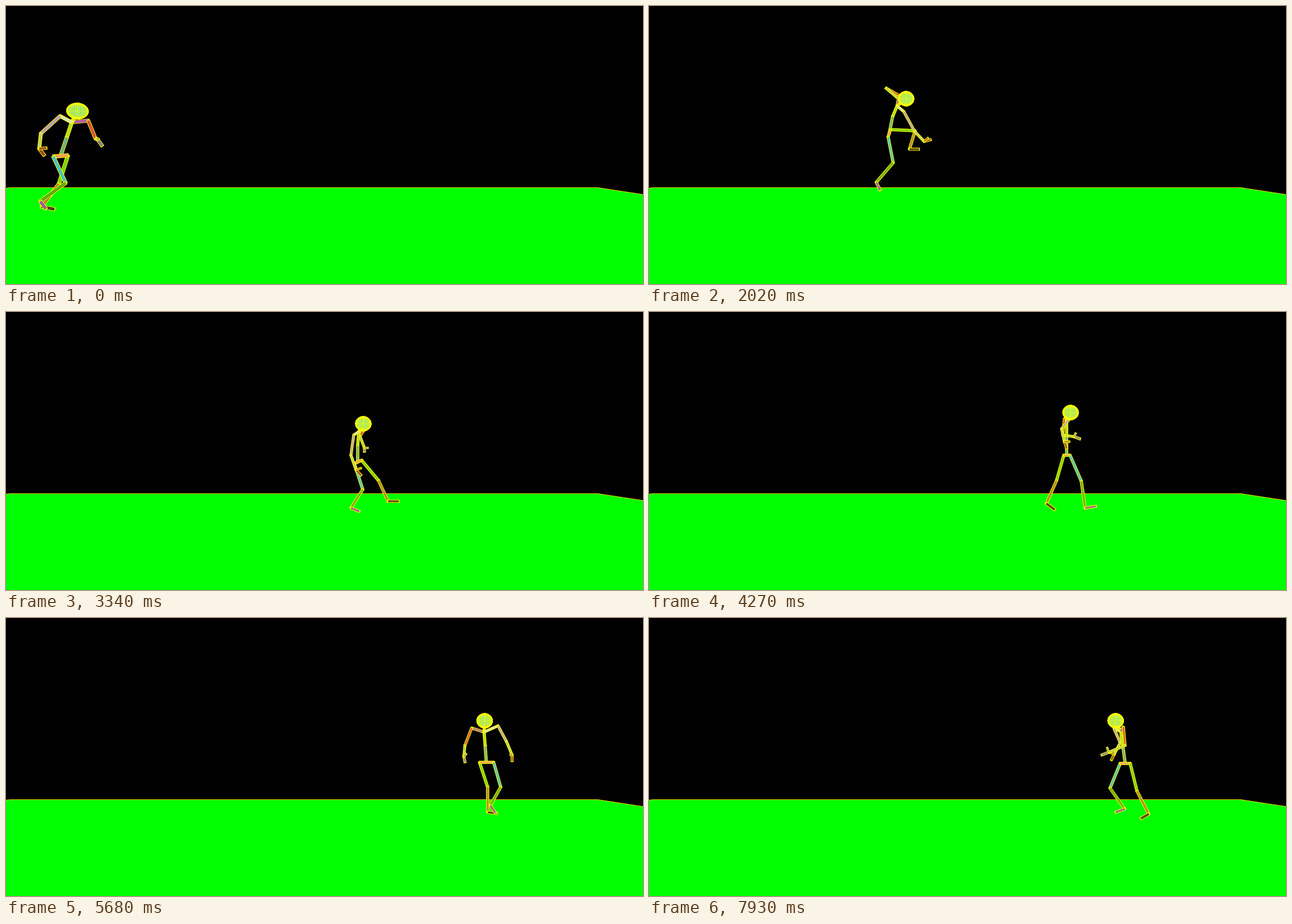
An HTML page with a canvas for the animation above (8000 ms loop, 1132 px wide and 495 px high).

```html
<!DOCTYPE html>
<html>
<head>
<meta charset="utf-8">
<style>
html, body { margin: 0; height: 100%; overflow: hidden; background: #000; }
canvas { display: block; }
</style>
</head>
<body>
<canvas id="stage" width="1132" height="495"></canvas>
<script>
const ctx = document.getElementById('stage').getContext('2d');
const LOOP = 8000, STEP = LOOP / 103, LAST = 102;
const YELLOW = '#ff0';

// Every part is a track of flat x,y lists, kept relative to the hip centre.
const tracks = { hip: [], trunk: [], pelvis: [], armA: [], armB: [], legA: [], legB: [] };

function key(time, hip, parts) {
  tracks.hip.push({ time, v: hip });
  for (const name in parts)
    tracks[name].push({ time, v: parts[name].map((n, i) => n - hip[i % 2]) });
}

// trunk: head, neck, mid spine; pelvis: two hips;
// arm: shoulder, elbow, wrist, fingers, thumb; leg: knee, ankle, toe
key(0, [97, 267], {
  trunk: [127, 187, 117, 207, 108, 234], pelvis: [84, 268, 110, 266],
  armA: [96, 196, 62, 227, 59, 254, 68, 266, 72, 253],
  armB: [146, 204, 159, 236, 163, 238, 171, 249, 164, 236],
  legA: [106, 315, 61, 348, 71, 361], legB: [94, 317, 63, 357, 86, 362] });
key(300, [123, 263], {
  legA: [150, 302, 124, 356, 146, 367], legB: [126, 312, 85, 340, 94, 357] });
key(540, [148, 264], {
  legA: [160, 312, 120, 358, 140, 370], legB: [172, 306, 140, 335, 152, 349] });
key(860, [203, 266], {
  armA: [227, 205, 220, 239, 252, 243, 270, 240, 262, 234],
  legA: [188, 316, 112, 344, 120, 362], legB: [240, 304, 228, 352, 250, 356] });
key(1090, [247, 272], {
  trunk: [282, 195, 272, 208, 259, 240], pelvis: [243, 273, 252, 271],
  armA: [268, 207, 256, 239, 285, 254, 300, 253, 292, 246],
  armB: [281, 211, 268, 236, 284, 257, 290, 268, 291, 247],
  legA: [265, 322, 205, 329, 211, 347], legB: [269, 321, 228, 357, 249, 360] });
key(1400, [305, 268], {
  legA: [340, 300, 350, 344, 370, 341], legB: [296, 314, 250, 338, 260, 353] });
key(1700, [372, 260], {
  trunk: [398, 192, 386, 205, 378, 230],
  legA: [395, 305, 366, 344, 384, 356], legB: [402, 286, 372, 316, 380, 331] });
key(2020, [427, 227], {
  trunk: [457, 165, 441, 178, 433, 197], pelvis: [425, 233, 429, 220],
  armA: [453, 188, 472, 223, 489, 241, 501, 238, 496, 235],
  armB: [444, 159, 421, 146, 440, 162, 447, 166, 446, 160],
  legA: [434, 279, 404, 314, 411, 328], legB: [473, 222, 463, 255, 480, 255] });
key(2570, [518, 213], {
  trunk: [538, 147, 528, 161, 520, 187],
  legA: [526, 261, 503, 297, 512, 310], legB: [553, 233, 540, 272, 557, 273] });
key(2950, [575, 244], {
  trunk: [590, 176, 582, 190, 576, 216],
  legA: [594, 290, 598, 342, 617, 346], legB: [612, 272, 606, 313, 624, 315] });
key(3340, [625, 267], {
  trunk: [635, 199, 627, 213, 625, 238], pelvis: [619, 270, 632, 264],
  armA: [618, 219, 613, 255, 622, 281, 631, 291, 631, 278],
  armB: [635, 212, 629, 221, 637, 242, 637, 249, 643, 242],
  legA: [634, 316, 613, 349, 628, 355], legB: [662, 300, 679, 337, 698, 337] });
key(3800, [688, 257], {
  legA: [708, 300, 676, 332, 688, 345], legB: [697, 302, 693, 346, 713, 350] });
key(4270, [742, 255], {
  trunk: [749, 179, 742, 192, 742, 222], pelvis: [748, 255, 737, 255],
  armA: [749, 188, 733, 208, 738, 231, 742, 243, 747, 231],
  armB: [738, 190, 735, 219, 755, 222, 766, 226, 758, 216],
  legA: [768, 301, 775, 349, 794, 346], legB: [724, 300, 706, 341, 721, 352] });
key(4700, [792, 254], {
  legA: [796, 302, 777, 350, 797, 350], legB: [806, 298, 780, 332, 792, 345] });
key(5140, [828, 257], {
  legA: [818, 305, 776, 340, 789, 351], legB: [848, 300, 853, 344, 873, 343] });
key(5680, [854, 257], {
  trunk: [851, 183, 850, 203, 852, 228], pelvis: [867, 257, 842, 257],
  armA: [875, 192, 890, 220, 900, 244, 900, 255, 897, 243],
  armB: [828, 196, 816, 227, 814, 247, 816, 257, 818, 242],
  legA: [880, 301, 862, 334, 871, 347], legB: [856, 301, 856, 346, 872, 348] });
key(6010, [867, 256], {
  legA: [891, 301, 892, 342, 906, 347], legB: [862, 302, 858, 345, 872, 350] });
key(6450, [874, 255], {
  armA: [895, 190, 909, 219, 919, 243, 917, 254, 914, 243],
  legA: [890, 301, 893, 344, 900, 350], legB: [868, 300, 872, 330, 870, 342] });
key(6870, [872, 256], {
  legA: [872, 302, 886, 338, 880, 349], legB: [882, 304, 893, 346, 888, 357] });
key(7400, [860, 257], {
  legA: [838, 302, 866, 335, 852, 344], legB: [874, 306, 890, 349, 876, 358] });
key(7930, [846, 259], {
  trunk: [829, 183, 838, 202, 842, 229], pelvis: [837, 259, 855, 259],
  armA: [826, 197, 837, 222, 826, 243, 821, 253, 820, 240],
  armB: [843, 194, 846, 227, 817, 239, 804, 244, 814, 231],
  legA: [819, 303, 845, 340, 829, 346], legB: [867, 308, 888, 349, 874, 357] });

// Smooth curve through the keys
function sample(track, t) {
  const next = track.findIndex(k => k.time > t);
  if (next < 0) return track[track.length - 1].v;
  const b = track[next - 1], c = track[next];
  const a = track[next - 2] || b, d = track[next + 1] || c;
  const span = c.time - b.time, u = (t - b.time) / span;
  const w = u * u * (3 - 2 * u), out = u * (1 - u) ** 2, into = u * u * (u - 1);
  return b.v.map((p, i) => {
    const q = c.v[i];
    const m0 = (q - a.v[i]) / (c.time - a.time) * span;
    const m1 = (d.v[i] - p) / (d.time - b.time) * span;
    return p + (q - p) * w + m0 * out + m1 * into;
  });
}

function points(name, t, hip) {
  const v = sample(tracks[name], t), list = [];
  for (let i = 0; i < v.length; i += 2) list.push([v[i] + hip[0], v[i + 1] + hip[1]]);
  return list;
}

function line(p, q, width, color) {
  ctx.lineWidth = width;
  ctx.strokeStyle = color;
  ctx.beginPath();
  ctx.moveTo(...p);
  ctx.lineTo(...q);
  ctx.stroke();
}

function bone(p, q, color, width) {
  const len = Math.hypot(q[0] - p[0], q[1] - p[1]) || 1;
  const ex = (q[0] - p[0]) / len * 1.5, ey = (q[1] - p[1]) / len * 1.5;
  line([p[0] - ex, p[1] - ey], [q[0] + ex, q[1] + ey], width, YELLOW);
  line(p, q, width - 2.4, color);
  line(p, q, 0.8, '#dd3');
}

function chain(joints, colors, width) {
  colors.forEach((color, i) => bone(joints[i], joints[i + 1], color, width));
}

function drawHead([x, y], rx, ry) {
  const ring = (a, b) => {
    ctx.beginPath();
    ctx.ellipse(x, y, Math.max(a, 0.1), Math.max(b, 0.1), 0.08, 0, 7);
  };
  ring(rx, ry);
  ctx.fillStyle = '#6fd9a0';
  ctx.fill();
  ctx.strokeStyle = YELLOW;
  ctx.lineWidth = 1;
  for (let i = 0; i <= 8; i++) {
    const s = Math.sin(i * Math.PI / 16);
    ring(rx * s, ry);
    ctx.stroke();
    const h = ry * s, half = rx * Math.sqrt(1 - s * s);
    for (const side of [-1, 1])
      line([x - half, y + side * h], [x + half, y + side * h], 0.7, YELLOW);
  }
  ctx.lineWidth = 3;
  ring(rx - 1.5, ry - 1.5);
  ctx.stroke();
}

function drawGround() {
  ctx.fillStyle = '#000';
  ctx.fillRect(0, 0, 1132, 495);
  ctx.beginPath();
  ctx.moveTo(-2, 324.5);
  ctx.lineTo(8, 323.5);
  ctx.lineTo(1052, 323.5);
  ctx.lineTo(1134, 336);
  ctx.lineTo(1134, 497);
  ctx.lineTo(-2, 497);
  ctx.fillStyle = '#0f0';
  ctx.fill();
  ctx.strokeStyle = '#fd0';
  ctx.lineWidth = 1;
  ctx.stroke();
}

function drawFigure(t) {
  const hip = sample(tracks.hip, t);
  const get = name => points(name, t, hip);
  const near = Math.max(0, 1 - t / 1500), width = 5.6 + 1.6 * near;
  const [head, neck, mid] = get('trunk'), [hipA, hipB] = get('pelvis');

  const leg = (name, start, colors) => chain([start, ...get(name)], colors, width);
  const arm = (name, colors) => {
    const joints = get(name);
    chain([neck, ...joints], colors, width - 0.4);
    bone(joints[2], joints[4], colors[3], width - 1.4);
  };
  const sideA = () => {
    leg('legA', hipA, ['#18b8f0', '#3f9a10', '#8038c0']);
    arm('armA', ['#d8e4e8', '#b090d0', '#b4cc80', '#801030']);
  };
  const sideB = () => {
    leg('legB', hipB, ['#58d000', '#a06828', '#100010']);
    arm('armB', ['#a028d0', '#d01848', '#a8c860', '#6058c0']);
  };

  const turned = t > 5900;
  (turned ? sideA : sideB)();
  chain([head, neck, mid, hip], ['#d8e820', '#a8dc18', '#48a0a0'], width);
  bone(hipA, hipB, '#f49060', width);
  (turned ? sideB : sideA)();
  drawHead(head, 14.4 + 5.4 * near, 13.2 + near);
}

function frame(now) {
  const t = now % LOOP;
  drawGround();
  drawFigure(Math.min(LAST, Math.floor((t + 5) / STEP)) * STEP);
  requestAnimationFrame(frame);
}
requestAnimationFrame(frame);
</script>
</body>
</html>
```
